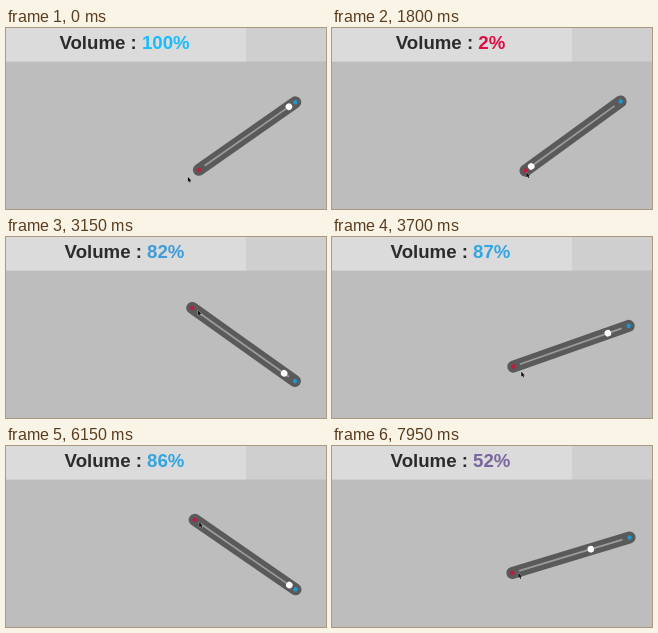
Write an HTML page that moves like this. It is 320x181 px and loops after 8 s.

```html
<!DOCTYPE html>
<html lang="en">
<head>
<meta charset="utf-8">
<title>Tilting volume slider</title>
<style>
  html, body { margin: 0; width: 100%; height: 100%; overflow: hidden; background: #bdbdbd; }
  svg { display: block; width: 100%; height: 100%; }
  text { font: bold 18.65px "Liberation Sans", Arial, sans-serif; white-space: pre; }
</style>
</head>
<body>
<svg viewBox="0 0 320 181">
  <rect width="320" height="181" fill="#bdbdbd"/>
  <rect width="320" height="33.5" fill="#cfcfcf"/>
  <rect width="240" height="33.5" fill="#dbdbdb"/>
  <text x="118.5" y="20.8" text-anchor="middle" fill="#2b2b2b">Volume : <tspan id="value"></tspan></text>
  <g id="slider">
    <line id="body" x2="60.5" stroke="#5a5a5a" stroke-width="12" stroke-linecap="round"/>
    <line id="track" x2="53" stroke="#9c9c9c" stroke-width="1.7"/>
    <circle id="low" r="2.2" fill="#c21a40"/>
    <circle cx="60.5" r="2.2" fill="#1e96d0"/>
    <circle id="ball" r="3.3" fill="#fff"/>
  </g>
  <path id="cursor" d="M0 0V5.2L1.2 4.2L2 6L2.9 5.6L2.1 3.9H3.7Z" fill="#111" stroke="#eee" stroke-width=".5" paint-order="stroke"/>
</svg>
<script>
const LOOP = 8000, STEP = 50;
const CENTER = { x: 239.7, y: 109 };
const RED = [228, 8, 60], BLUE = [25, 189, 250];
const LEAD = 50; // the pointer runs ahead of the bar it drags

// A value that rests, then eases to each target: [start, duration, target]
const swings = (from, ...moves) => t => moves.reduce((v, [start, span, to]) => {
  const u = Math.min(1, Math.max(0, (t - start) / span));
  return v + (to - v) * (1 - Math.cos(Math.PI * u)) / 2;
}, from);

const tilt = swings(-35, [1000, 700, -36], [1800, 1037, 36], [3100, 870, -35],
  [4680, 692, 37], [6034, 850, -16], [7000, 500, 5], [7500, 450, -16.8]);
const ball = swings(52.8, [0, 1750, -50], [1850, 650, -60], [2500, 750, 52],
  [3420, 1200, -54], [5100, 1000, 53], [6450, 1000, -6], [7450, 700, 26]);
const volume = swings(100, [0, 1800, 2], [2500, 900, 99],
  [3331, 1569, 7], [5050, 1459, 99], [6509, 941, 35], [7450, 700, 56]);
const arm = swings(57.2, [1850, 650, 73], [2600, 900, 62]);
const grab = swings(0, [900, 1400, 1]);

const $ = id => document.getElementById(id);
const set = (id, name, value) => $(id).setAttribute(name, value);

function lowEnd(t) {
  const a = tilt(t) * Math.PI / 180, r = arm(t);
  return { x: CENTER.x - r * Math.cos(a), y: CENTER.y - r * Math.sin(a) };
}

function draw(t) {
  const r = arm(t), g = grab(t), level = Math.round(volume(t));
  set("slider", "transform", `translate(${CENTER.x} ${CENTER.y}) rotate(${tilt(t)})`);
  set("body", "x1", -r);
  set("track", "x1", 7 - r);
  set("low", "cx", -r);
  set("ball", "cx", ball(t));

  const tip = lowEnd(t + LEAD);
  set("cursor", "transform", `translate(${tip.x - 11 + 17 * g} ${tip.y + 7 * (1 - g)})`);

  const color = RED.map((v, i) => Math.round(v + (BLUE[i] - v) * level / 100));
  $("value").textContent = level + "%";
  set("value", "fill", `rgb(${color})`);
}

const start = performance.now();
function tick() {
  const t = Math.max(0, performance.now() - start) % LOOP;
  draw(Math.floor(t / STEP) * STEP);
  requestAnimationFrame(tick);
}
tick();
</script>
</body>
</html>
```
